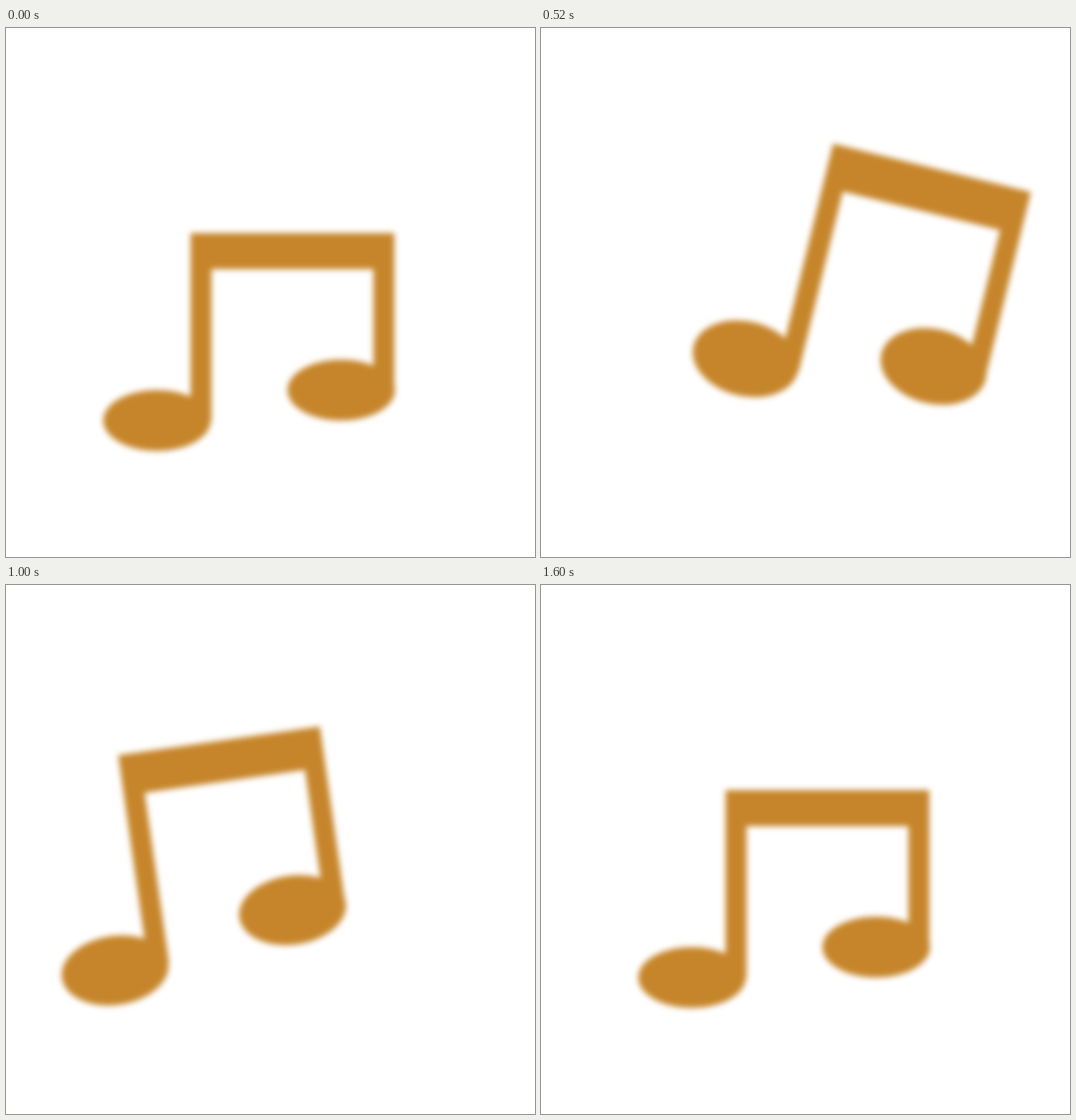
These frames come from a looping animation (748 px wide and 748 px high, 1680 ms). An HTML page with a canvas:

```html
<!DOCTYPE html>
<html lang="en">
<head>
<meta charset="utf-8">
<title>Swaying note</title>
<style>
  html, body { margin: 0; width: 100%; height: 100%; overflow: hidden; background: #fff; }
  canvas { display: block; width: 100vw; height: 100vh; }
</style>
</head>
<body>
<canvas id="stage" width="748" height="748"></canvas>
<script>
const ctx = document.getElementById('stage').getContext('2d');
const SIZE = 748, CENTER = SIZE / 2;
const LOOP = 1680, STEP = 40, LAST = 1600;

// Each swing leaves the rest pose, peaks, and comes back.
const SWINGS = [
  { start: 0, peak: 412, end: 795, side: 1, x: 150, y: -101 },
  { start: 808, peak: 1200, end: 1600, side: -1, x: -195, y: -119 }
];
const MAX_TURN = 16.3 * Math.PI / 180;
const MAX_STRETCH = 0.268;

const note = new Path2D();
note.rect(261, 290, 288, 51);
note.rect(261, 290, 29.5, 265);
note.rect(519.5, 290, 29.5, 222);
for (const [x, y] of [[213.5, 555], [474, 512]]) {
  note.moveTo(x + 76, y);
  note.ellipse(x, y, 76, 43, 0, 0, Math.PI * 2);
}

function easeInOut(x) {
  const a = x ** 1.75;
  return a / (a + (1 - x) ** 1.75);
}

function amount({ start, peak, end }, t) {
  if (t <= start || t >= end) return 0;
  return t < peak
    ? easeInOut((t - start) / (peak - start))
    : easeInOut((end - t) / (end - peak));
}

function draw(t) {
  const swing = SWINGS[t < 800 ? 0 : 1];
  const p = amount(swing, t);
  const shift = p ** 1.06, bend = p ** 0.95;

  ctx.fillStyle = '#fff';
  ctx.fillRect(0, 0, SIZE, SIZE);
  ctx.save();
  ctx.translate(CENTER + swing.x * shift, CENTER + swing.y * shift);
  ctx.rotate(swing.side * MAX_TURN * bend);
  ctx.scale(1, 1 + MAX_STRETCH * bend);
  ctx.translate(-CENTER, -CENTER);
  ctx.filter = 'blur(4.2px)';
  ctx.fillStyle = '#c6852a';
  ctx.fill(note);
  ctx.restore();
}

const origin = performance.now();
function tick() {
  const t = (performance.now() - origin) % LOOP;
  draw(Math.min(LAST, Math.floor(t / STEP) * STEP));
  requestAnimationFrame(tick);
}
tick();
</script>
</body>
</html>
```
